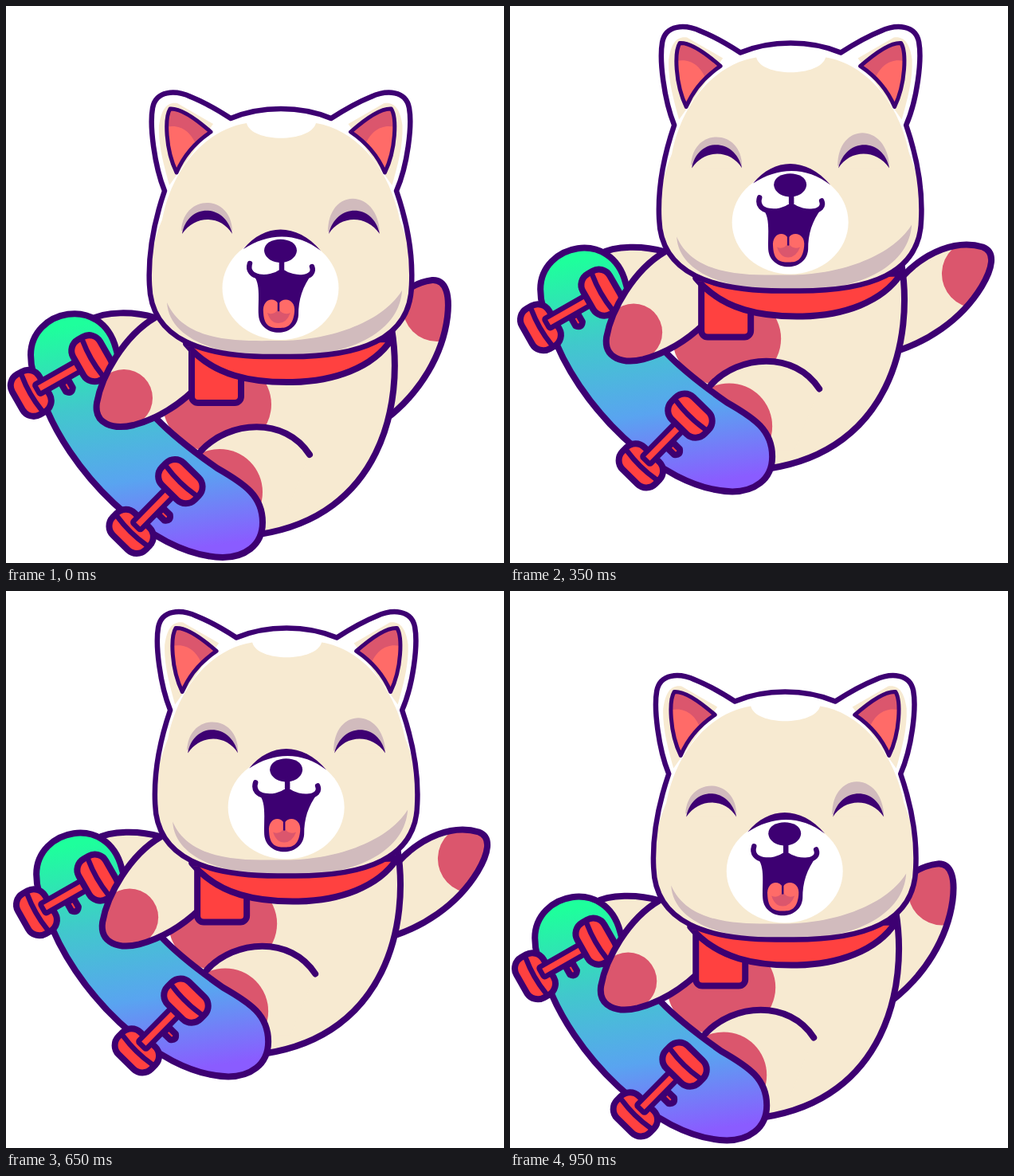
These frames come from a looping animation (625 px wide and 699 px high, 1 s). An HTML page:

```html
<!DOCTYPE html>
<html lang="en">
<head>
<meta charset="utf-8">
<title>Skating pup</title>
<style>
html, body { margin: 0; height: 100%; overflow: hidden; background: #fff; }
svg { display: block; width: 100vw; height: 100vh; }
.line { stroke: #3d0072; stroke-width: 8; stroke-linecap: round; stroke-linejoin: round; }
.mid { stroke-width: 6.5; }
.thin { stroke-width: 5; }
.none { fill: none; }
.cream { fill: #f7ead1; }
.red { fill: #ff4140; }
.rose { fill: #db566d; }
.pink { fill: #ff6b68; }
.mauve { fill: #d1bbbd; }
.ink { fill: #3d0072; }
.white { fill: #fff; }
</style>
</head>
<body>
<svg viewBox="0 0 625 699">
  <defs>
    <linearGradient id="deck" gradientUnits="userSpaceOnUse" x1="120" y1="395" x2="165" y2="692">
      <stop offset="0" stop-color="#1eff9c"/>
      <stop offset=".35" stop-color="#41c8cc"/>
      <stop offset=".68" stop-color="#59a4f0"/>
      <stop offset="1" stop-color="#8a5cff"/>
    </linearGradient>
    <path id="arm" d="M458 420C472 378 502 348 535 344C553 343 557 364 554 390C548 438 520 484 480 516L450 500"/>
    <path id="paw" d="M187 391C148 414 120 464 114 498C110 525 135 532 160 526C190 518 215 502 236 482"/>
    <path id="earShape" d="M206 129C199 140 200 180 214 209C222 190 236 172 257 158C240 143 220 128 206 129Z"/>
    <path id="head" d="M199 232C186 200 180 150 184 128C188 106 212 105 232 114C252 122 268 132 282 141C320 125 370 125 408 141C422 132 438 122 458 114C478 105 502 106 506 128C510 150 504 200 490 232C503 270 511 310 509 350C508 418 445 442 345 440C245 442 182 418 180 350C178 310 186 270 199 232Z"/>
    <clipPath id="armClip"><use href="#arm"/></clipPath>
    <clipPath id="pawClip"><use href="#paw"/></clipPath>
    <clipPath id="earClip"><use href="#earShape"/></clipPath>
    <g id="ear">
      <path class="cream" d="M192 150C195 128 203 120 215 122L260 148L205 225C198 200 191 175 192 150Z"/>
      <use href="#earShape" class="pink"/>
      <path class="rose" clip-path="url(#earClip)" d="M195 155C212 145 232 154 239 176L270 160L230 120H195Z"/>
      <use href="#earShape" class="line thin none"/>
    </g>
    <g id="wheel" class="line">
      <rect class="red" x="-19.5" y="-29" width="39" height="58" rx="16"/>
      <path class="none mid" d="M1-25Q-3 0 1 25"/>
    </g>
    <g id="truck">
      <path class="line red" d="M-5 8V20Q0 27 5 20V8Z"/>
      <use href="#wheel" x="-44"/>
      <rect class="line mid red" x="-35" y="-7" width="70" height="14" rx="2"/>
      <use href="#wheel" x="44"/>
    </g>
  </defs>

  <g id="pup">
    <g id="wave">
      <use href="#arm" class="cream"/>
      <circle class="rose" cx="541" cy="378" r="43" clip-path="url(#armClip)"/>
      <use href="#arm" class="line none"/>
    </g>

    <!-- body and legs -->
    <path class="line cream" d="M105 394C125 383 160 383 187 391L180 460H110Z"/>
    <path class="cream" d="M484 405C500 500 470 640 318 663L200 520V390Z"/>
    <ellipse class="rose" cx="265" cy="500" rx="68" ry="60"/>
    <path class="cream" d="M245 558C280 520 350 515 381 563L350 640H290Z"/>
    <circle class="rose" cx="268" cy="610" r="54"/>
    <path class="line none" d="M245 558C280 520 350 515 381 563"/>
    <path class="line none" d="M484 405C500 500 470 640 318 663"/>

    <!-- skateboard -->
    <path class="line" fill="url(#deck)" d="M31 438C31 381 120 361 138 430C155 500 215 545 265 580C300 600 322 615 322 648C322 678 298 692 272 692C180 690 75 580 45 490C35 465 31 455 31 438Z"/>
    <use href="#truck" transform="translate(69.5 464) rotate(-29.7)"/>
    <use href="#truck" transform="translate(188 628) rotate(-45.5)"/>

    <path class="cream" d="M187 391C148 414 120 464 114 498C110 525 135 532 160 526C190 518 215 502 236 482L240 425L200 392Z"/>
    <circle class="rose" cx="148" cy="492" r="36" clip-path="url(#pawClip)"/>
    <use href="#paw" class="line none"/>

    <!-- collar -->
    <rect class="line red" x="233" y="425" width="62" height="73" rx="8"/>
    <path class="line red" d="M226 424C260 465 310 473 360 472C410 471 460 455 484 418Z"/>

    <!-- head -->
    <use href="#head" class="white"/>
    <use href="#ear"/>
    <use href="#ear" transform="translate(689.5 0) scale(-1 1)"/>
    <path class="cream" d="M196 268C208 205 250 155 302 147C308 172 382 172 389 147C440 155 482 205 494 268C503 290 511 320 509 350C508 418 445 442 345 440C245 442 182 418 180 350C178 320 187 290 196 268Z"/>
    <path class="mauve" d="M202 372C225 425 300 420 345 420C400 420 470 400 497 357C494 405 440 440 345 440C270 440 205 420 202 372Z"/>
    <use href="#head" class="line mid none"/>

    <!-- face -->
    <path class="mauve" d="M220 282C222 235 284 235 284 284Z"/>
    <path class="mauve" d="M404 283C404 228 466 228 469 284Z"/>
    <path class="cream" d="M221 286C240 258 272 260 284 286Z"/>
    <path class="cream" d="M405 286C417 260 449 258 469 286Z"/>
    <path class="ink" d="M221 286C228 247 275 247 284 286C270 263 238 261 221 286Z"/>
    <path class="ink" d="M405 286C414 247 461 247 469 286C452 261 419 263 405 286Z"/>
    <ellipse class="white" cx="344.5" cy="354" rx="73" ry="65"/>
    <path class="ink" d="M298 305C325 272 365 272 395 307C365 284 330 284 298 305Z"/>
    <path class="ink" d="M324 307C324 288 365 288 365 307C364 318 352 322 344.5 322C337 322 325 318 324 307Z"/>
    <path class="line mid none" d="M346 318V332M306 323C300 342 330 345 346 333C362 345 390 342 384 327"/>
    <path class="ink" d="M307 335C321 344 316 368 317 388C319 417 365 417 367 388C367 368 372 352 385 335C372 342 356 340 346 333C336 340 320 342 307 335Z"/>
    <path class="pink" d="M323 385C321 368 336 364 342 374C348 364 364 368 362 384C360 404 350 404 342 404C332 404 324 402 323 385Z"/>
    <path class="rose" d="M328 385Q336 389 342 380Q348 389 357 385Q352 398 342 398Q332 398 328 385Z"/>
    <path class="line none" style="stroke-width:2.5" d="M342 371V382"/>
  </g>
</svg>
<script>
const LOOP = 1000, STEP = 50;
const pup = document.getElementById('pup');
const wave = document.getElementById('wave');

function draw(now) {
  const t = Math.floor((now % LOOP) / STEP) * STEP;
  const k = (1 - Math.cos(2 * Math.PI * t / LOOP)) / 2;
  pup.setAttribute('transform', `translate(${9 * k} ${-104 * k})`);
  wave.setAttribute('transform', `rotate(${30.5 * k} 465 484)`);
}

const start = performance.now();
function tick() {
  draw(performance.now() - start);
  requestAnimationFrame(tick);
}
tick();
</script>
</body>
</html>
```
